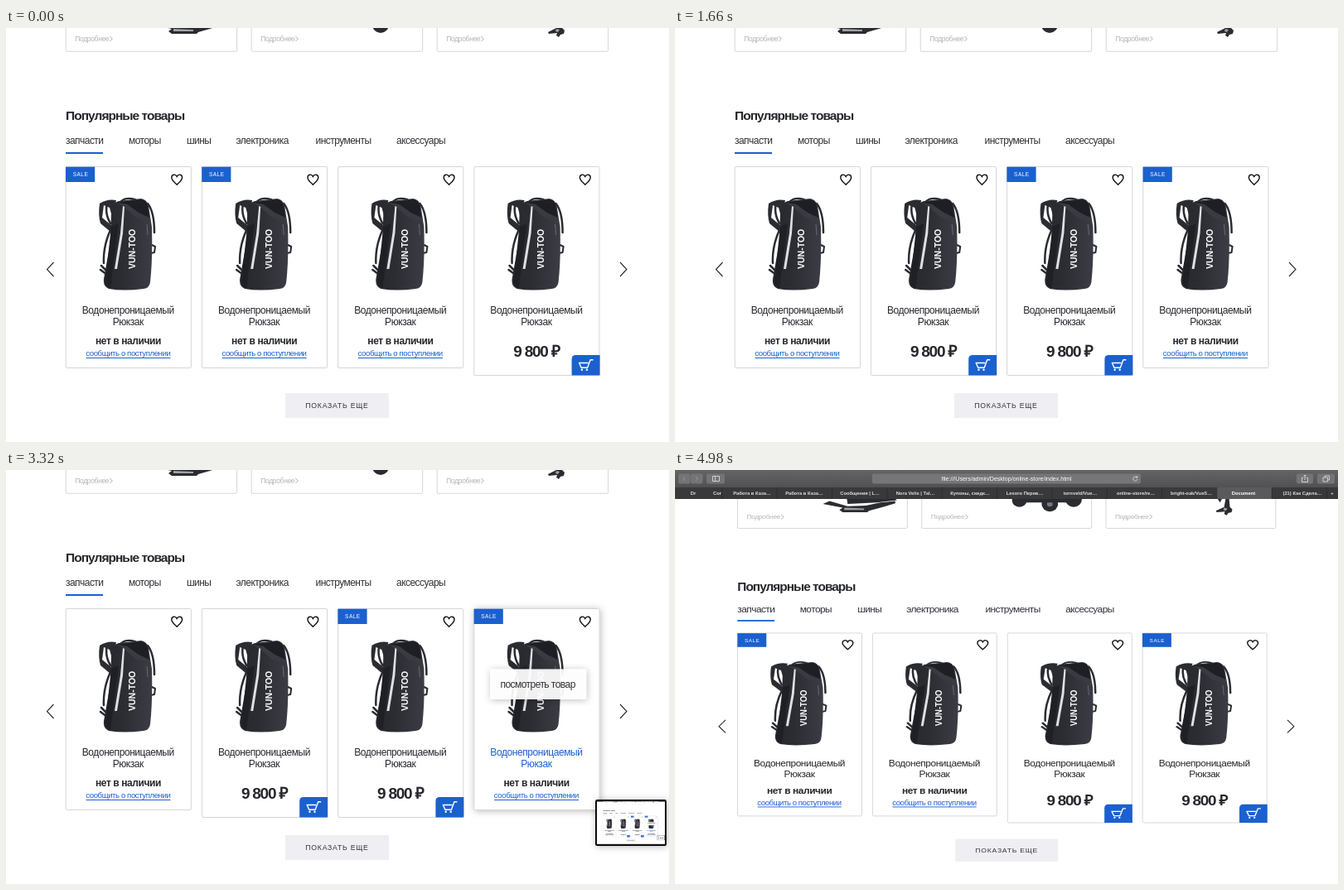
An HTML page that plays this animation: 800 by 500 pixels, repeating every 5.81 s.

```html
<!DOCTYPE html>
<html lang="ru">
<head>
<meta charset="utf-8">
<style>
  html, body { margin: 0; width: 100%; height: 100%; overflow: hidden; background: #fff; }
  #stage { display: block; width: 800px; height: 500px; }
  text { font-family: "Liberation Sans", Arial, sans-serif; fill: #26272d; }
  .heading { font-weight: bold; font-size: 15.5px; letter-spacing: -.97px; }
  .tab, .view { font-size: 12px; letter-spacing: -.54px; fill: #303138; }
  .more { font-size: 8.5px; letter-spacing: -.35px; fill: #b4b4b8; }
  .name { font-size: 12px; letter-spacing: -.43px; }
  .none { font-weight: bold; font-size: 12px; letter-spacing: -.4px; }
  .notify { font-size: 9.6px; letter-spacing: -.41px; fill: #1b60cf; }
  .price { font-weight: bold; font-size: 19px; letter-spacing: -1.25px; }
  .sale { font-size: 6.5px; letter-spacing: .5px; fill: #fff; }
  .button { font-size: 8.7px; letter-spacing: .75px; fill: #33343a; }
  .hover .name, .hover .price { fill: #1b60cf; }
  .brand { font-weight: bold; font-size: 10.5px; fill: #fff; }
  .url { font-size: 7.05px; fill: #fff; }
  .page-tab { font-weight: bold; font-size: 5.8px; fill: #dededf; }
  .line { fill: none; stroke: #26272d; }
</style>
</head>
<body>
<svg id="stage" viewBox="0 0 800 500">
  <defs>
    <filter id="shadow" x="-20%" y="-20%" width="140%" height="140%">
      <feDropShadow dx="1" dy="1" stdDeviation="4" flood-opacity=".27"/>
    </filter>
    <linearGradient id="chrome" x2="0" y2="1">
      <stop stop-color="#646467"/><stop offset="1" stop-color="#515154"/>
    </linearGradient>
    <linearGradient id="fabric">
      <stop stop-color="#27282e"/><stop offset=".4" stop-color="#2c2d33"/><stop offset="1" stop-color="#3c3d44"/>
    </linearGradient>
    <g id="bag">
      <path fill="#2b2c32" d="M113 212Q122 206 133 208L128 228 125 217 118 214 116 229 128 239 126 246 114 236Q111 226 113 212Z"/>
      <g fill="none" stroke="#2b2c32" stroke-linejoin="round" stroke-linecap="round">
        <path stroke-width="2.500" d="M122 212Q119 224 126 236M126 244Q117 264 118 284M115 287L125 297M114 292L122 298M171 212Q179 222 179 247"/>
        <path stroke-width="2" d="M139 209Q145 204 156 207M176 262l4 2-1 7-4 1"/>
      </g>
      <path fill="url(#fabric)" d="M127 222Q128 211 136 209L163 206Q170 207 172 215L176 240Q177 280 174 307Q173 314 166 315Q142 318 124 315Q117 312 118 303L126 258Z"/>
      <path fill="#1e1f24" d="M134 211l28-4q7 0 9 7l2 15-13-6-14-10Z"/>
      <path fill="#3a3b42" d="M134 211l12 2 14 10 14 7-2 3-15-4-15-13Z"/>
      <path fill="#1f2025" d="M127 240l9-4-10 78q-7-2-6-10Z"/>
      <path fill="#e0e0e3" d="M141 215l2 1-2 32-7 43h-3l7-43Z"/>
      <path class="line" style="stroke:#6a6b72" d="M170 237l1 13"/>
      <text class="brand" transform="translate(156.300 291) rotate(-90)">VUN-TOO</text>
    </g>
    <g id="cart">
      <path fill="#1b60cf" d="M190 419.500V400q0-5 5-5h29v24.500Z"/>
      <path class="line" style="stroke:#fff" stroke-width="1.400" stroke-linejoin="round" d="M216 400.700h-3.500l-3.500 9.500h-7.500l-2.500-5.700h11"/>
      <circle cx="202.300" cy="412.700" r="1.200" fill="#fff"/><circle cx="208.300" cy="412.700" r="1.200" fill="#fff"/>
    </g>
    <g id="vehicles" fill="#2b2c31">
      <path d="M176-4l8-4 22 7 22-1 18-4 18-2v3l-18 6-14 4-2 2h-30l-4-3 4-3Z"/>
      <path d="M205-12h58l3 3-24 3-36 2Z"/>
      <path fill="#a0a1a6" d="M202 1l24 1v2h-24Z"/>
      <circle cx="415" cy="-9" r="9"/><circle cx="452" cy="-4" r="10"/><circle cx="481" cy="-10" r="10"/>
      <circle cx="452" cy="-4" r="3.500" fill="#77787e"/><path d="M415-12h65v6h-65Z"/>
      <path d="M666-12h4l1 12 3 3-1 4-4 1-2 3-3-2 1-3-10 1-1-2 10-5Z"/>
      <path fill="#a0a1a6" d="M664 1l4 1-2 3-3-1Z"/>
      <path d="M656-11l6-1-3 6Z"/>
    </g>
  </defs>
  <g id="scene"></g>
</svg>
<script>
const STEP = 830;
const PITCH = 164.2;
const LEFT = 72;
const BLUE = '#1b60cf';

// Card indexes carrying each feature
const states = [
  { sale: [0, 1], stock: [3] },
  { sale: [0, 3], stock: [2, 3] },
  { sale: [2, 3], stock: [1, 2] },
  { sale: [2, 3], stock: [1, 2], hover: 3, preview: 2 },
  { sale: [2, 3], stock: [1, 2], hover: 3, preview: 3 },
  { sale: [2, 3], stock: [1, 2], hover: 1 },
  { sale: [0, 3], stock: [2, 3], browser: true }
];

const menu = [['запчасти', 72], ['моторы', 148], ['шины', 218],
  ['электроника', 277.5], ['инструменты', 373.5], ['аксессуары', 471]];

const pageTabs = [['Dr', 22], ['Cor', 51], ['Работа в Каза…', 93], ['Работа в Каза…', 156],
  ['Сообщения | L…', 223], ['Nora Velis | Tal…', 290], ['Купоны, скидк…', 356],
  ['Lexoro Перев…', 422], ['tornveld/Vue…', 489], ['online-store/re…', 556],
  ['bright-oak/VueS…', 623], ['Document', 686], ['(21) Как Сдела…', 757], ['+', 793]];

const text = (cls, x, y, str, anchor = 'middle', extra = '') =>
  `<text class="${cls}" x="${x}" y="${y}" text-anchor="${anchor}" ${extra}>${str}</text>`;
const rect = (x, y, w, h, fill, extra = '') =>
  `<rect x="${x}" y="${y}" width="${w}" height="${h}" fill="${fill}" ${extra}/>`;
const line = (d, width = 1, color = '#26272d') =>
  `<path class="line" d="${d}" stroke-width="${width}" style="stroke:${color}"/>`;

function card(i, { sale, stock, hover }) {
  const inStock = stock.includes(i), active = hover === i;
  const height = inStock ? 252 : 243, boxY = inStock ? 243 : 240.5;
  return `<g transform="translate(${i * PITCH})" class="${active ? 'hover' : ''}">` +
    rect(72.2, 167.5, 151.2, height, '#fff', `rx="1.5" stroke="#d6d6d9" ${active ? 'filter="url(#shadow)"' : ''}`) +
    (sale.includes(i) ? rect(72, 167.7, 35.2, 18.3, BLUE) + text('sale', 90, 179.3, 'SALE') : '') +
    line('M206.200 189.200C203 186.200 199.800 183.700 199.800 180.700C199.800 176.500 204.500 176 206.200 179.400C207.900 176 212.600 176.500 212.600 180.700C212.600 183.700 209.400 186.200 206.200 189.200Z', 1.4, '#111') +
    '<use href="#bag"/>' +
    text('name', 147.3, 344.7, 'Водонепроницаемый') +
    text('name', 147.3, 359.3, 'Рюкзак') +
    (inStock
      ? text('price', 147.3, 396.8, '9 800 ₽') + '<use href="#cart"/>'
      : text('none', 147.5, 381.5, 'нет в наличии') +
        text('notify', 147.3, 396, 'сообщить о поступлении') + rect(96.5, 398, 102, 1, BLUE)) +
    (active
      ? rect(91.5, boxY, 116, 36.5, '#fff', 'fill-opacity=".92" rx="1" filter="url(#shadow)"') +
        text('view', 149, boxY + 22.3, 'посмотреть товар')
      : '') +
    '</g>';
}

function page(state) {
  const topCards = [72, 296, 520].map(x =>
    rect(x + .2, -60, 206.5, 88.3, '#fff', 'rx="1.5" stroke="#d6d6d9"') +
    text('more', x + 11.3, 16, 'Подробнее', 'start') +
    line(`M${x + 53.3} 10l3 3-3 3`, .9, '#a5a5aa')).join('');
  return topCards + '<use href="#vehicles"/>' +
    text('heading', LEFT, 111.2, 'Популярные товары', 'start') +
    menu.map(([label, x]) => text('tab', x, 140.3, label, 'start')).join('') +
    rect(LEFT, 150, 45, 2, BLUE) +
    line('M57.500 283l-8 8.500 8 8.500M741 283l8 8.500-8 8.500', 1.1) +
    [0, 1, 2, 3].map(i => card(i, state)).join('') +
    rect(337, 441, 125, 30, '#efeff3') +
    text('button', 399.5, 459.2, 'ПОКАЗАТЬ ЕЩЕ');
}

function browser() {
  const buttons = [[4, 14.5], [19, 14.5], [38, 22], [750, 20], [775, 21]];
  return rect(0, 0, 800, 21, 'url(#chrome)') + rect(0, 21, 800, 14, '#39393c') +
    rect(653.5, 21, 66.5, 14, '#5a5a5d') +
    buttons.map(([x, w]) => rect(x, 4.5, w, 12, '#747477', 'rx="2"')).join('') +
    rect(238, 4.5, 324, 12, '#767679', 'rx="2"') +
    line('M12.500 8l-2.500 2.500 2.500 2.500M25 8l2.500 2.500-2.500 2.500', .8, '#a0a0a3') +
    line('M45.500 7.500h8v6h-8ZM48.500 7.500v6M758 9.500h-1.500v5h7v-5h-1.500M760 12v-6l-1.500 1.500M760 6l1.500 1.500M782 9h5.500v5h-5.500ZM784 9v-2h5.500v5h-2M557.500 9a2.600 2.600 0 1 0 .500 2M557.800 7v2.200h-2.200', .8, '#e4e4e6') +
    text('url', 400, 13, 'file:///Users/admin/Desktop/online-store/index.html') +
    [...Array(12).keys()].map(i => rect(56.5 + i * 66.33, 21, .7, 14, '#29292b')).join('') +
    pageTabs.map(([label, x]) => text('page-tab', x, 30.2, label, 'middle',
      label === 'Document' ? 'style="fill:#fff"' : '')).join('');
}

function scene(index) {
  const state = states[index];
  if (state.browser) return `<g transform="matrix(.992 0 0 .909 3.9 44.7)">${page(state)}</g>` + browser();
  if (state.preview === undefined) return page(state);
  return page(state) + rect(711, 398, 86, 56, '#111', 'rx="2.5" filter="url(#shadow)"') +
    rect(713, 400.5, 82, 51.3, '#fff') +
    `<svg x="713" y="400.5" width="82" height="51.3" viewBox="0 0 800 500">${scene(state.preview)}</svg>`;
}

const root = document.getElementById('scene');
let shown = -1;
function tick(now) {
  const index = Math.floor(now / STEP) % states.length;
  if (index !== shown) root.innerHTML = scene(shown = index);
  requestAnimationFrame(tick);
}
tick(performance.now());
</script>
</body>
</html>
```
